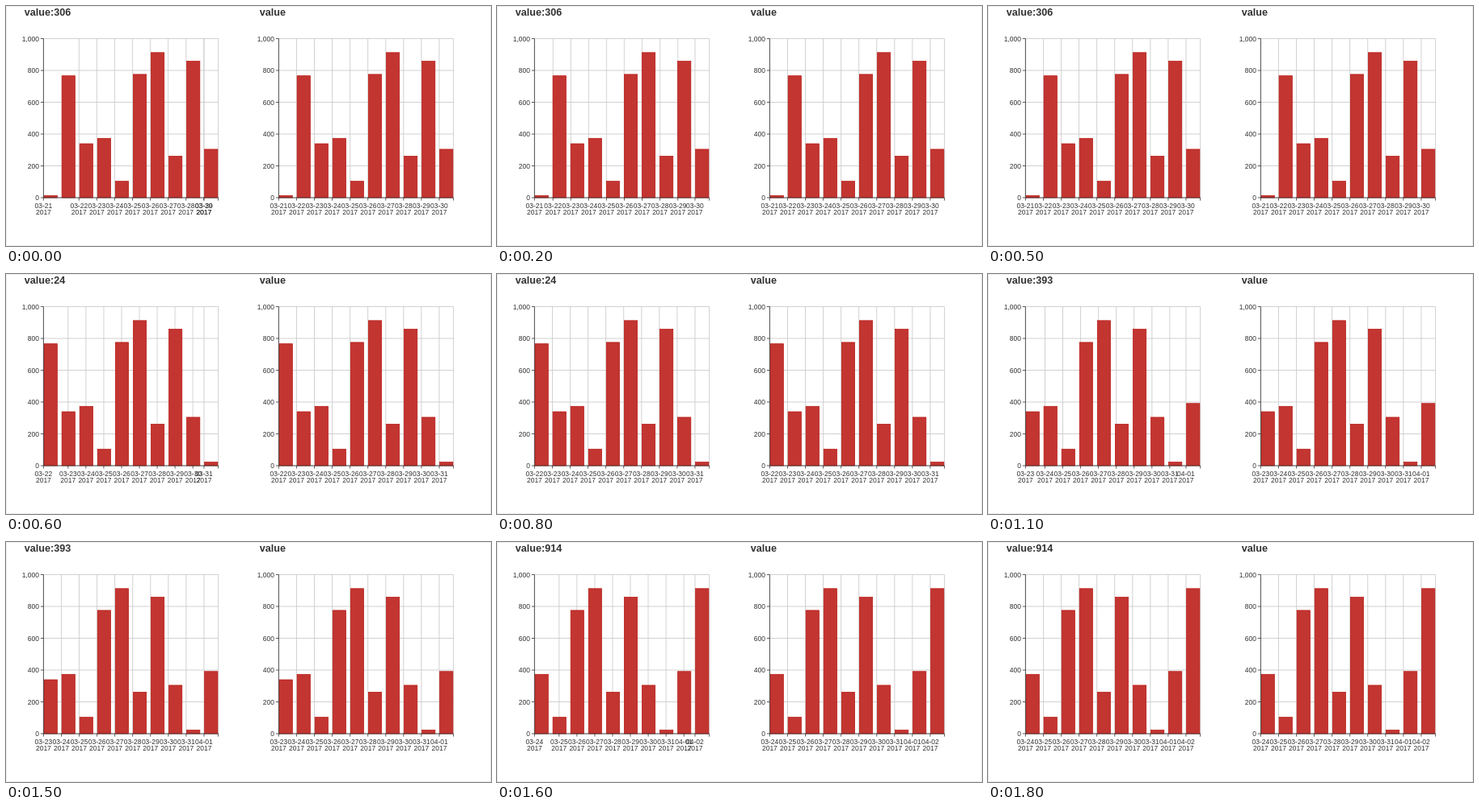
Animation of 600x298 px, one loop 1900 ms. Source, as an HTML page:

```html
<!DOCTYPE html>
<html lang="en">
<head>
<meta charset="utf-8">
<title>Rolling bar charts</title>
<style>
  html, body { margin: 0; width: 100%; height: 100%; overflow: hidden; background: #fff; }
  svg { display: block; width: 600px; height: 298px; }
  text { font: 8.5px "Liberation Sans", Arial, sans-serif; fill: #333; }
  .title { font-size: 12.6px; font-weight: bold; }
  .mid { text-anchor: middle; }
  .end { text-anchor: end; }
  .frame { fill: none; stroke: #ebebeb; }
  .grid { stroke: #ccc; stroke-width: .9; }
  .axis { stroke: #333; stroke-width: .8; }
  .bar { fill: #c23531; stroke: #b8150f; stroke-width: .7; }

  .state { visibility: hidden; animation: 1.9s step-end infinite; }
  .s0 { animation-name: show0; }
  .s1 { animation-name: show1; }
  .s2 { animation-name: show2; }
  .s3 { animation-name: show3; }
  @keyframes show0 { 0% { visibility: visible } 31.5789%, 100% { visibility: hidden } }
  @keyframes show1 { 0% { visibility: hidden } 31.5789% { visibility: visible } 52.6316%, 100% { visibility: hidden } }
  @keyframes show2 { 0% { visibility: hidden } 52.6316% { visibility: visible } 84.2105%, 100% { visibility: hidden } }
  @keyframes show3 { 0% { visibility: hidden } 84.2105%, 100% { visibility: visible } }

  /* 300 ms cubic ease-out by one day's width */
  .slide { animation: slide 1.9s infinite both; }
  .s1 .slide { animation-delay: 518ms; }
  .s2 .slide { animation-delay: 935ms; }
  .s3 .slide { animation-delay: 1518ms; }
  @keyframes slide {
    0% { transform: translateX(22.06px); animation-timing-function: cubic-bezier(.3333, 1, .6667, 1); }
    15.7895%, 100% { transform: translateX(0); }
  }
</style>
</head>
<body>
<svg id="stage" viewBox="0 0 600 298"></svg>
<script>
  const values = [15, 768, 341, 375, 105, 777, 914, 263, 860, 306, 24, 393, 914];
  const days = 10, step = 22.06, x0 = 46.4, x1 = 262.6, yTop = 40.5, yBase = 238;
  const yOf = v => yBase - v * (yBase - yTop) / 1000;
  const xOf = i => x0 + i * step;

  const line = (cls, xa, ya, xb, yb) =>
    `<line class="${cls}" x1="${xa}" y1="${ya}" x2="${xb}" y2="${yb}"/>`;
  const text = (cls, x, y, s) => `<text class="${cls}" x="${x}" y="${y}">${s}</text>`;
  const group = (cls, body) => `<g class="${cls}">${body}</g>`;

  function dateOf(n) {
    const day = 21 + n;
    const parts = day > 31 ? [4, day - 31] : [3, day];
    return parts.map(k => String(k).padStart(2, "0")).join("-");
  }

  // Inner ticks glide; the first and last stay put.
  function ticks(draw, moving) {
    let fixed = "", inner = "";
    for (let i = 0; i < days; i++) {
      if (moving && i > 0 && i < days - 1) inner += draw(i);
      else fixed += draw(i);
    }
    return fixed + group("slide", inner);
  }

  function bars(first) {
    return values.slice(first, first + days).map((v, i) =>
      `<rect class="bar" x="${xOf(i) + .65}" y="${yOf(v) + .35}" width="16.3" height="${yBase - yOf(v) - .35}"/>`
    ).join("");
  }

  function chart(first, moving) {
    const last = values[first + days - 1];
    let rows = "", scale = "";
    for (let v = 0; v <= 1000; v += 200) {
      const y = yOf(v);
      rows += line("grid", x0, y, x1, y);
      scale += line("axis", x0 - 3.6, y, x0, y) +
        text("end", 41, y + 3, v.toLocaleString("en-US"));
    }
    const columns = ticks(i => line("grid", xOf(i), yTop, xOf(i), yBase), moving) +
      line("grid", x1, yTop, x1, yBase);
    const labels = ticks(i =>
      line("axis", xOf(i), yBase, xOf(i), yBase + 3.6) +
      text("mid", xOf(i), 250.5, dateOf(first + i)) +
      text("mid", xOf(i), 259.2, 2017), moving);
    return text("title", 22.8, 12, moving ? "value:" + last : "value") +
      rows + columns + bars(first) + scale +
      line("axis", x0, yTop, x0, yBase) +
      line("axis", x0, yBase, x1, yBase) +
      line("axis", x1, yBase, x1, yBase + 3.6) + labels;
  }

  let out = '<rect class="frame" x=".5" y=".5" width="599" height="297"/>';
  for (let s = 0; s < 4; s++) {
    out += group("state s" + s,
      chart(s, true) + `<g transform="translate(291 0)">${chart(s, false)}</g>`);
  }
  document.getElementById("stage").innerHTML = out;
</script>
</body>
</html>
```
